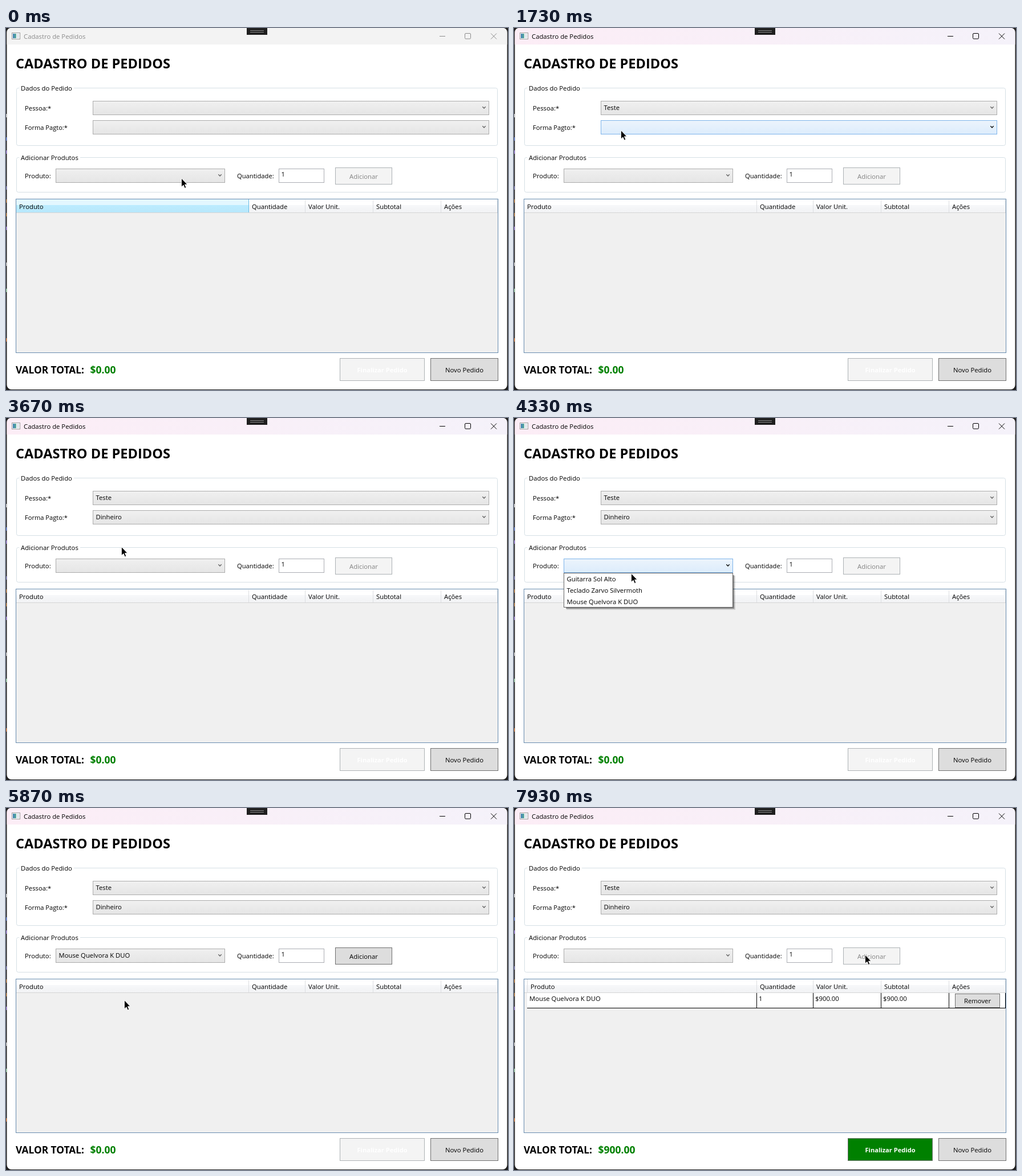
These frames come from a looping animation (880 px wide and 636 px high, 8000 ms). An HTML page:

```html
<!DOCTYPE html>
<html lang="pt-BR">
<head>
<meta charset="utf-8">
<style>
  html, body { margin: 0; width: 100%; height: 100%; overflow: hidden; background: #1f1f1f; }
  svg { display: block; }
  text { font-family: "Open Sans", "Noto Sans", sans-serif; white-space: pre; }
</style>
</head>
<body>
<svg id="stage" width="880" height="636" viewBox="0 0 880 636"></svg>
<script>
const stage = document.getElementById('stage');
const LOOP = 8000, TICK = 200 / 3;

const people = ['Gustavo de Melo Teixeira', 'Caio Benevides', 'Teste'];
const payments = ['Dinheiro', 'Cartão', 'Boleto'];
const products = ['Guitarra Sol Alto', 'Teclado Zarvo Silvermoth', 'Mouse Quelvora K DUO'];

// x, y, width of each combo; time its list opens and closes; picked item; time it clears
const combos = [
  { x: 152, y: 128, w: 695, drop: 153, items: people, open: 530, close: 1465, pick: 2, clear: LOOP },
  { x: 152, y: 162, w: 695, drop: 188, items: payments, open: 1865, close: 3065, pick: 0, clear: LOOP },
  { x: 87, y: 247, w: 297, drop: 272, items: products, open: 4065, close: 5665, pick: 2, clear: 7930 },
];
const columns = [[18, 'Produto'], [426, 'Quantidade'], [525, 'Valor Unit.'], [644, 'Subtotal'], [763, 'Ações'], [862]];

// time, x, y of the pointer
const path = [
  [-70, 309, 312], [0, 307, 264], [70, 303, 258], [330, 240, 178], [600, 207, 142], [930, 207, 142],
  [1070, 203, 188], [1330, 197, 203], [1470, 197, 203], [1730, 187, 180], [1800, 186, 175],
  [2470, 186, 175], [2730, 199, 192], [3470, 199, 192], [3870, 205, 262], [4270, 205, 266],
  [4330, 205, 273], [4530, 206, 279], [4870, 206, 279], [5330, 207, 320], [5670, 207, 320],
  [5870, 207, 338], [6130, 250, 360], [6470, 360, 344], [6600, 440, 328], [6800, 560, 284],
  [6930, 670, 238], [7070, 615, 258], [LOOP, 615, 258],
];

function pointerAt(t) {
  const i = Math.max(1, path.findIndex(p => p[0] >= t));
  const [t0, x0, y0] = path[i - 1], [t1, x1, y1] = path[i];
  const k = (t - t0) / (t1 - t0);
  return [x0 + (x1 - x0) * k, y0 + (y1 - y0) * k];
}

const inside = ([px, py], x, y, w, h) => px >= x && px < x + w && py >= y && py < y + h;

const text = (x, y, s, { size = 11.3, fill = '#000', bold, mid } = {}) =>
  `<text x="${x}" y="${y}" font-size="${size}" fill="${fill}"${bold ? ' font-weight="700"' : ''}${mid ? ' text-anchor="middle"' : ''}>${s}</text>`;

const rect = (x, y, w, h, fill, extra = '') =>
  `<rect x="${x}" y="${y}" width="${w}" height="${h}" fill="${fill}" ${extra}/>`;

// one-pixel border drawn inside the given pixel box
const box = (x, y, w, h, fill, stroke, extra = '') =>
  rect(x + .5, y + .5, w - 1, h - 1, fill, `stroke="${stroke}" ${extra}`);

const line = (d, stroke, width = 1) => `<path d="${d}" fill="none" stroke="${stroke}" stroke-width="${width}"/>`;

const gradient = (id, dir, ...stops) => `<linearGradient id="${id}" x2="${dir === 'h' ? 1 : 0}" y2="${dir === 'h' ? 0 : 1}">` +
  stops.map(([at, c]) => `<stop offset="${at}" stop-color="${c}"/>`).join('') + '</linearGradient>';

const defs = '<defs>' +
  gradient('bar', 'h', [0, '#fcedf6'], [1, '#f5f2fa']) +
  gradient('combo', 'v', [0, '#f0f0f0'], [1, '#e5e5e5']) +
  gradient('comboHot', 'v', [0, '#ecf4fc'], [1, '#dcecfc']) +
  gradient('head', 'v', [0, '#fff'], [.4, '#fff'], [.41, '#f7f8fa'], [1, '#f1f2f4']) +
  gradient('headHot', 'v', [0, '#e3f7ff'], [.4, '#e3f7ff'], [.41, '#bcecff'], [1, '#b7e7fb']) +
  gradient('icon', 'h', [0, '#3c78b4'], [1, '#5fb39a']) +
  '</defs>';

function button(x, y, w, h, label, state = 'normal', style = {}) {
  const [fill, stroke, ink] = {
    normal: ['#ddd', '#707070', '#000'],
    hot: ['#bee6fd', '#3c7fb1', '#000'],
    down: ['#c4e5f6', '#2c628b', '#000'],
    off: ['#f4f4f4', '#adb2b5', '#838383'],
    go: ['#008000', '#707070', '#fff'],
  }[state];
  return box(x, y, w, h, fill, stroke) +
    text(x + w / 2, y + h / 2 + 4.5, label, { fill: ink, mid: true, ...style });
}

function windowFrame(active) {
  const ink = active ? '#000' : '#8c8c8c';
  const specks = [[154, '#ccc'], [195, '#46c'], [218, '#86c'], [281, '#66a'], [304, '#a62'], [328, '#a62'],
    [352, '#86c'], [415, '#bbb'], [461, '#8c9'], [548, '#c62']];
  return rect(0, 0, 880, 636, '#1f1f1f') +
    specks.map(([y, c]) => rect(0, y - 3, 1.5, 6, c)).join('') +
    rect(1.5, 0, 877, 635, '#fff', 'rx="8"') +
    `<path d="M1.5 29V8Q1.5 0 9.5 0H870.5Q878.5 0 878.5 8V29Z" fill="${active ? 'url(#bar)' : '#f3f3f3'}"/>` +
    box(10, 8, 15, 12, '#fff', '#9a9a9a') + rect(12, 10, 6, 8, 'url(#icon)') + rect(19, 10, 4, 8, '#dfe5ea') +
    text(31, 18.5, 'Cadastro de Pedidos', { fill: ink }) +
    line('M760 14.5H770M850 9.5L860 19.5M860 9.5L850 19.5', ink) +
    rect(804.5, 9.5, 10, 9.5, 'none', `rx="1.5" stroke="${ink}"`) +
    rect(422, 0, 36, 12, '#1f1f1f') + line('M428 4.5H452M428 7.5H452', '#8a8a8a');
}

const group = (y, h, gap, title) => box(18, y, 844, h, 'none', '#d5dfe5', 'rx="3"') +
  rect(23, y - 2, gap, 5, '#fff') + text(26, y + 5, title);

function comboBox(c, t, hot) {
  const ink = hot ? '#000' : '#606060', cx = c.x + c.w - 9;
  const value = t >= c.close && t < c.clear ? c.items[c.pick] : '';
  return box(c.x, c.y, c.w, 25, hot ? 'url(#comboHot)' : 'url(#combo)', hot ? '#7eb4ea' : '#acacac') +
    line(`M${cx - 2.7} ${c.y + 10.3}l2.7 2.7l2.7 -2.7`, ink, 1.3) +
    text(c.x + 5.5, c.y + 16, value);
}

function dropList(c, t, hotItem) {
  const h = c.items.length * 20 + 1, shift = -h * (1 - Math.min(1, (t - c.open) / 190)) ** 2;
  const rows = c.items.map((s, i) =>
    (i === hotItem ? box(1, i * 20, c.w - 2, 21, '#b7dff1', '#26a0da') : '') +
    text(5.5, i * 20 + 15, s)).join('');
  return `<svg x="${c.x}" y="${c.drop}" width="${c.w + 4}" height="${h + 4}"><g transform="translate(0 ${shift})">` +
    rect(5, 5, c.w - 1, h - 1, '#000', 'opacity=".15"') + rect(4, 4, c.w - 2, h - 2, '#000', 'opacity=".35"') +
    box(0, 0, c.w, h, '#fff', '#646464') + rows + '</g></svg>';
}

function grid(added, hotColumn) {
  let s = box(17, 300, 846, 271, '#f0f0f0', '#688caf') + rect(18, 301, 844, 24, 'url(#head)');
  columns.slice(0, 5).forEach(([x, label], i) => {
    const end = columns[i + 1][0];
    if (i === hotColumn) s += rect(x, 301, end - x, 24, 'url(#headHot)') + line(`M${end - .5} 301V325`, '#69bbe3');
    else s += line(`M${end - .5} 302V324`, '#dcdee1');
    s += text(x + (i || !added ? 5 : 11), 318, label);
  });
  s += line('M18 324.5H862', '#d5d5d5');
  if (added) {
    s += line('M23.5 301V325', '#dcdee1') + rect(23, 325, 839, 27, '#fff') +
      line('M23 351.5H862M425.5 325V352M524.5 325V352M643.5 325V352M762.5 325V352M861.5 325V352', '#000') +
      text(27, 339, products[2]) + text(429, 339, '1') + text(528, 339, '$900.00') + text(647, 339, '$900.00') +
      button(773, 326, 79, 25, 'Remover');
  }
  return s;
}

function scene(t) {
  // hover feedback trails the pointer by one tick
  const [px, py] = pointerAt(t), feel = pointerAt(t - TICK);
  const opened = combos.find(c => t >= c.open && t < c.close);
  const added = t >= 7925;
  const hotCombo = c => (!opened || opened === c) && inside(feel, c.x, c.y, c.w, 25);
  const hotColumn = opened ? -1 : columns.slice(0, 5).findIndex(([x], i) => inside(feel, x, 301, columns[i + 1][0] - x, 24));
  let add = 'off';
  if (t >= 5665 && !added) add = t >= 7795 ? 'down' : inside(feel, 577, 245, 100, 30) ? 'hot' : 'normal';

  return defs + windowFrame(t >= 530) +
    text(17, 70.5, 'CADASTRO DE PEDIDOS', { size: 23.6, bold: true }) +
    group(105, 102, 96, 'Dados do Pedido') + text(33, 144.5, 'Pessoa:*') + text(33, 179, 'Forma Pagto:*', { size: 11.1 }) +
    group(227, 62, 107, 'Adicionar Produtos') + text(33, 264, 'Produto:') + text(405, 264, 'Quantidade:', { size: 11.2 }) +
    combos.map(c => comboBox(c, t, hotCombo(c))).join('') +
    box(478, 247, 80, 25, '#fff', '#abadb3') + text(482.5, 261, '1') +
    button(577, 245, 100, 30, 'Adicionar', add) +
    grid(added, hotColumn) +
    text(17, 607, 'VALOR TOTAL:', { size: 17.3, bold: true }) +
    text(147.5, 607, added ? '$900.00' : '$0.00', { size: 17.5, bold: true, fill: '#008000' }) +
    button(585, 580, 149, 40, 'Finalizar Pedido', added ? 'go' : 'off', { size: 11.1, bold: true, fill: '#fff' }) +
    button(744, 580, 119, 40, 'Novo Pedido') +
    (opened ? dropList(opened, t, inside(feel, opened.x, opened.drop, opened.w, 60) ? Math.floor((feel[1] - opened.drop) / 20) : -1) : '') +
    `<path transform="translate(${px} ${py})" d="M.5 0V15.2L4 12L6.4 17.4L8.8 16.3L6.5 11H11Z" fill="#000" stroke="#fff" stroke-width=".9"/>`;
}

let shown = -1;
function frame() {
  const tick = Math.floor((performance.now() % LOOP + 4) / TICK) % 120;
  if (tick !== shown) stage.innerHTML = scene((shown = tick) * TICK);
  requestAnimationFrame(frame);
}
frame();
</script>
</body>
</html>
```
